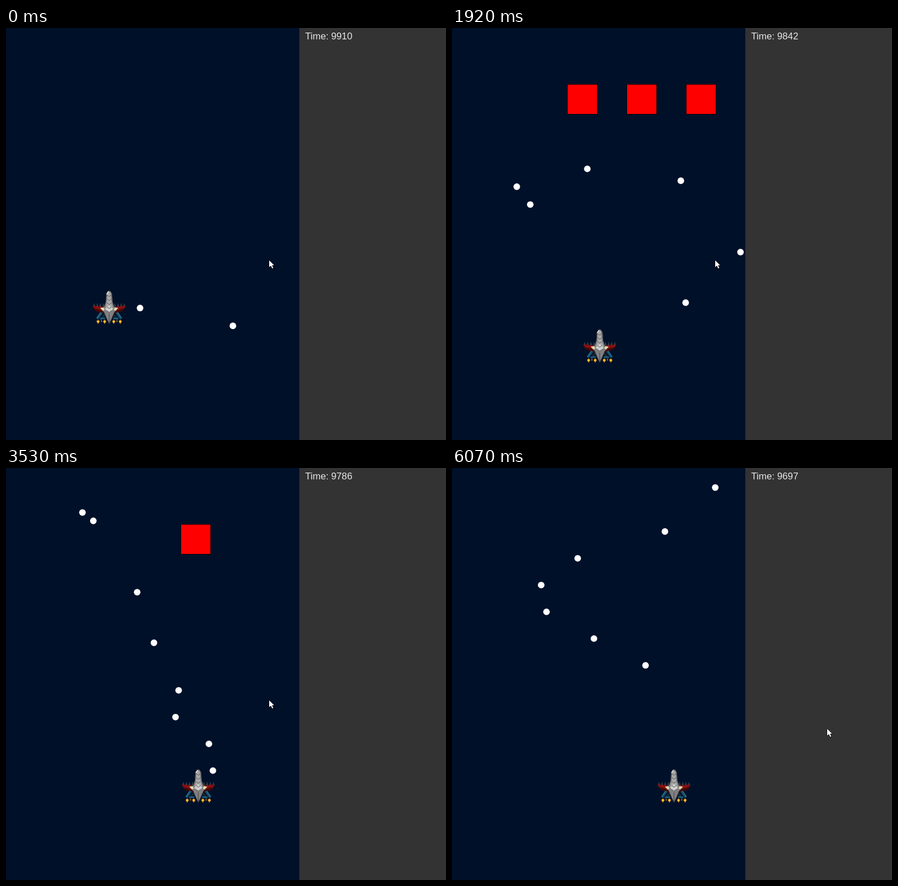
These frames come from a looping animation (774 px wide and 724 px high, 6100 ms). An HTML page with a canvas:

```html
<!DOCTYPE html>
<html lang="en">
<head>
<meta charset="utf-8">
<title>Space shooter</title>
<style>
  html, body { margin: 0; width: 100%; height: 100%; overflow: hidden; background: #001029; }
  canvas { display: block; }
</style>
</head>
<body>
<canvas id="stage" width="774" height="724"></canvas>
<script>
const ctx = document.getElementById('stage').getContext('2d');
const LOOP = 6100, LAST_TICK = 213, MS_PER_TICK = 6070 / LAST_TICK;
const UNIT = 1.045;
const SHIP_STEP = 5 * UNIT, SHOT_STEP = 3 * UNIT;
const SWAY = 140 * UNIT, TURN = Math.PI / 60, SHOT_RADIUS = 5.8;
const FIRST_SHOT = -18, LAST_SHOT = 147, RELOAD = 15;
const ENEMY_START = 25, ENEMY_TOP = 99.5, ENEMY_SIZE = 51.5;

// Ticks during which each arrow key is held: [from, to]
const KEYS = {
  left: [[-20, 3], [45, 86], [147, 148]],
  right: [[4, 45], [91, 135]],
  up: [[-20, 17]],
  down: [[27, 45], [52, 64]]
};

const clamp = (v, lo, hi) => Math.min(hi, Math.max(lo, v));

// Signed ticks a key has been held since tick 0
function held(key, tick) {
  return KEYS[key].reduce((sum, [from, to]) => sum + clamp(tick, from, to) - clamp(0, from, to), 0);
}

function shipAt(tick) {
  return {
    x: 181.5 + SHIP_STEP * (held('right', tick) - held('left', tick)),
    y: 491 + SHIP_STEP * (held('down', tick) - held('up', tick))
  };
}

function hits(shot, enemy) {
  const reach = ENEMY_SIZE / 2 + SHOT_RADIUS;
  return Math.abs(shot.x - enemy - ENEMY_SIZE / 2) < reach &&
    Math.abs(shot.y - ENEMY_TOP - ENEMY_SIZE / 2) < reach;
}

function fire(tick) {
  const ship = shipAt(tick), odd = (tick - FIRST_SHOT) / RELOAD % 2;
  const x = Math.max(ship.x, shipAt(tick - 1).x);
  return { base: x, x, y: ship.y - SHIP_STEP, phase: odd * 1.4 };
}

// Plays the whole game once and keeps the scene at every tick.
function simulate() {
  const scenes = [], shots = [];
  let enemies = [];
  for (let tick = FIRST_SHOT; tick <= LAST_TICK; tick++) {
    if (tick === ENEMY_START) enemies = [0, 1, 2].map(i => 203.5 + 100 * UNIT * i);
    // Removing a shot makes the next one miss its turn.
    for (let i = 0; i < shots.length; i++) {
      const s = shots[i];
      s.phase++;
      s.x = s.base + SWAY * Math.sin(s.phase * TURN);
      s.y -= SHOT_STEP;
      const target = enemies.find(e => hits(s, e));
      if (target) enemies = enemies.filter(e => e !== target);
      if (target || s.y < -15) shots.splice(i, 1);
    }
    if (tick <= LAST_SHOT && (tick - FIRST_SHOT) % RELOAD === 0) shots.push(fire(tick));
    if (tick >= 0) scenes.push({ ship: shipAt(tick), enemies, shots: shots.map(({ x, y }) => ({ x, y })) });
  }
  return scenes;
}

function poly(fill, pts, stroke) {
  ctx.beginPath();
  for (let i = 0; i < pts.length; i += 2) ctx.lineTo(pts[i], pts[i + 1]);
  ctx.closePath();
  ctx.fillStyle = fill;
  ctx.fill();
  if (!stroke) return;
  ctx.strokeStyle = stroke;
  ctx.lineWidth = 1;
  ctx.stroke();
}

function line(color, width, x0, y0, x1, y1) {
  ctx.strokeStyle = color;
  ctx.lineWidth = width;
  ctx.beginPath();
  ctx.moveTo(x0, y0);
  ctx.lineTo(x1, y1);
  ctx.stroke();
}

function drawWing() {
  for (let x = 10; x < 29; x += 5.5) poly('#3b4247', [x - 2, 0, x, -8, x + 2, 0]);
  poly('#3d0a0a', [5, 0, 28, -2, 26, 5, 18, 9, 8, 12]);
  poly('#861010', [8, -1, 29, -3, 26, 2, 17, 4, 10, 8]);
  line('#1c2a33', 3, 7, 12, 16, 21);
  line('#17506b', 4, 13, 9, 21, 20);
  line('#2b7592', 1.5, 15, 9, 22, 19);
  line('#1d5a78', 3, 7, 19, 16, 20);
  for (const x of [8, 19.5]) {
    poly('#e89a16', [x - 3, 24.5, x, 21.5, x + 3, 24.5, x, 29]);
    poly('#ffdc4a', [x - 1.6, 24, x + 1.6, 24, x, 27]);
  }
  line('#c88b20', 1.5, 13.7, 22.5, 13.7, 25.5);
}

function drawShip({ x, y }) {
  ctx.save();
  ctx.translate(x, y);
  for (const side of [-1, 1]) {
    ctx.save();
    ctx.scale(side, 1);
    drawWing();
    ctx.restore();
  }
  poly('#808082', [-2, -29, 2, -29, 5, -24, 6, -10, 9, -1, 15, 2, 9, 9, 4, 21, 0, 29,
    -4, 21, -9, 9, -15, 2, -9, -1, -6, -10, -5, -24], '#2c2c30');
  poly('#a9a9aa', [-3, -26, 2, -27, 4, -8, 7, 3, 0, 9, -7, 3, -4, -8]);
  for (const side of [-1, 1]) poly('#e6d8ac', [side * 16, 1, side * 10, 0, side * 8, 4, side * 11, 6]);
  poly('#cfcfcf', [-7, 3, 0, -4, 7, 3, 0, 8]);
  for (let v = -20; v < 12; v += 7) {
    line('#55555a', 1, -4, v - 2, 0, v + 1);
    line('#55555a', 1, 4, v - 2, 0, v + 1);
  }
  line('#ededed', 1.5, -4.5, -23, -1, -28);
  line('#4e4e52', 1.2, 0, 11, 0, 27);
  ctx.restore();
}

function drawShot({ x, y }) {
  ctx.beginPath();
  ctx.arc(x, y, SHOT_RADIUS, 0, 2 * Math.PI);
  ctx.fillStyle = '#fff';
  ctx.fill();
}

function drawEnemy(x) {
  ctx.strokeStyle = '#000';
  ctx.lineWidth = 1.5;
  ctx.strokeRect(x, ENEMY_TOP, ENEMY_SIZE, ENEMY_SIZE);
  ctx.fillStyle = '#f00';
  ctx.fillRect(x, ENEMY_TOP, ENEMY_SIZE, ENEMY_SIZE);
}

// The pointer drifts up a little, then sweeps over to the side panel.
function drawCursor(ms) {
  const lift = clamp((ms - 4240) / 120, 0, 1);
  const p = clamp((ms - 4360) / 640, 0, 1), sweep = p * p * (3 - 2 * p);
  ctx.save();
  ctx.translate(463 + 9 * lift + 188 * sweep, 408 - 14 * lift + 64 * sweep);
  poly('#fff', [0, 0, 0, 12.5, 3, 10, 5.3, 15, 7.3, 14.2, 5.2, 9.3, 9, 9], '#000');
  poly('#fff', [0, 0.5, 0, 12, 3, 9.5, 5.3, 14.5, 7, 13.8, 4.8, 8.8, 8.3, 8.6]);
  ctx.restore();
}

const scenes = simulate();

function draw(ms) {
  const tick = Math.min(LAST_TICK, Math.floor(ms / MS_PER_TICK + 0.75));
  const scene = scenes[tick];
  ctx.fillStyle = '#001029';
  ctx.fillRect(0, 0, 516, 724);
  scene.shots.forEach(drawShot);
  scene.enemies.forEach(drawEnemy);
  drawShip(scene.ship);
  ctx.fillStyle = '#333';
  ctx.fillRect(516, 0, 258, 724);
  ctx.fillStyle = '#e8e8e8';
  ctx.font = '16.7px "Liberation Sans", Arial, sans-serif';
  ctx.fillText('Time: ' + (9910 - tick), 526.3, 20);
  drawCursor(ms);
}

const start = performance.now();
function loop() {
  draw((performance.now() - start) % LOOP);
  requestAnimationFrame(loop);
}
loop();
</script>
</body>
</html>
```
